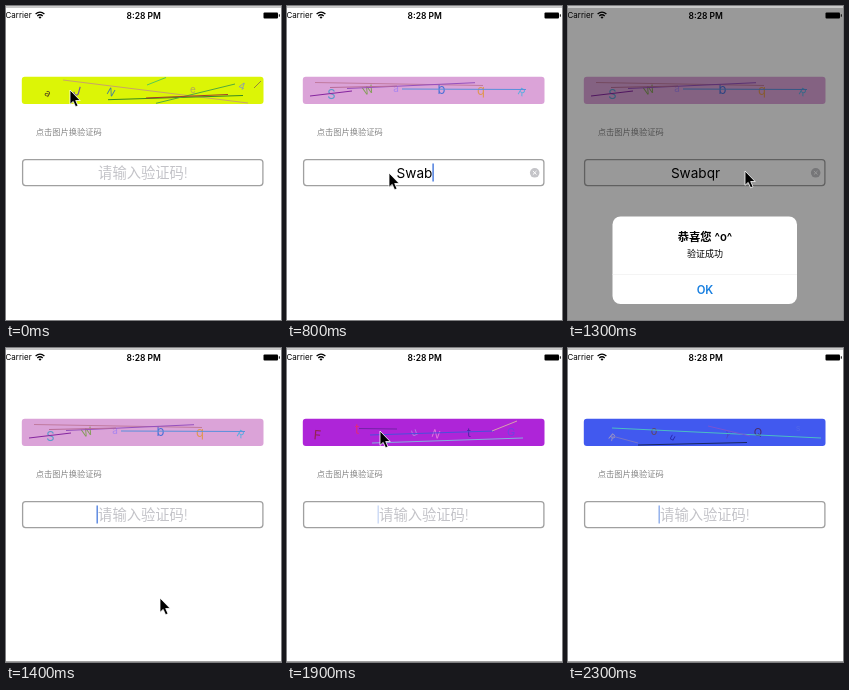
An HTML page for the animation above (2400 ms loop, 275 px wide and 314 px high).

```html
<!DOCTYPE html>
<html lang="zh-CN">
<head>
<meta charset="utf-8">
<style>
html, body { margin: 0; width: 100%; height: 100%; overflow: hidden; background: #fff; }
svg { display: block; width: 275px; height: 314px; }
text { font-family: Inter, "Noto Sans CJK SC", "Noto Sans CJK", sans-serif; }
.mid { text-anchor: middle; }
</style>
</head>
<body>
<svg viewBox="0 0 275 314">
  <rect width="275" height="314" fill="#fff"/>
  <g id="status">
    <text x="-.5" y="12.4" font-size="8">Carrier</text>
    <g fill="none" stroke="#000" stroke-width="1.3">
      <path d="M29.6 8.1Q34 4.2 38.4 8.1M31.3 10Q34 7.5 36.7 10"/>
      <path d="M34 12.8L32.5 11.2Q34 10 35.5 11.2Z" fill="#000" stroke="none"/>
    </g>
    <text x="137.7" y="12.5" font-size="8.5" font-weight="600" class="mid">8:28 PM</text>
    <rect x="257.5" y="6.5" width="14.5" height="6" rx="1"/>
    <rect x="272.8" y="8.3" width="1" height="2.4"/>
  </g>
  <g id="captcha"></g>
  <text x="29.7" y="128.8" font-size="8.25" fill="#858585">点击图片换验证码</text>
  <rect x="16.6" y="153.6" width="240.3" height="26" rx="3" fill="#fff" stroke="#a0a0a0" stroke-width="1.3"/>
  <text id="hint" x="137" y="171.8" font-size="14.3" font-weight="300" fill="#c3c3c8" class="mid">请输入验证码!</text>
  <text id="entry" x="127.5" y="171.6" font-size="13.6" class="mid"></text>
  <rect id="caret" y="157.5" width="1.4" height="18" fill="#4276dc"/>
  <g id="clear">
    <circle cx="247.7" cy="166.8" r="4.8" fill="#c4c4c8"/>
    <path d="M245.9 165l3.6 3.6m0-3.6l-3.6 3.6" stroke="#fff"/>
  </g>
  <g id="alert">
    <rect width="275" height="314" opacity=".4"/>
    <rect x="44.5" y="210.5" width="184.5" height="87.5" rx="8" fill="#fff"/>
    <path d="M44.5 268.5H229" stroke="#f0f0f0" stroke-width=".7"/>
    <text x="137" y="235" font-size="11.3" font-weight="600" class="mid">恭喜您 ^o^</text>
    <text x="137" y="251.3" font-size="9" class="mid">验证成功</text>
    <text x="137" y="287.6" font-size="11.3" font-weight="600" fill="#187fe0" class="mid">OK</text>
  </g>
  <path id="floor" d="M0 313.5H275" stroke="#a0a0a0"/>
  <path d="M0 1H275" stroke="#c9c9c9" stroke-width="2"/>
  <path id="pointer" d="M0 0V14.3L3.2 11.4L5.6 16.8L8 15.7L5.7 10.5H10.2Z" fill="#000" stroke="#fff" stroke-width=".8"/>
</svg>
<script>
const LOOP = 2400, STEP = 100;
const el = id => document.getElementById(id);

// Glyph: character, centre x, centre y, size, turn, colour. Line: path, colour.
const captchas = {
  yellow: {
    fill: '#dcf506',
    glyphs: [['a', 42, 87, 10, 30, '#57471c'], ['J', 71, 85, 13, 15, '#7658a0'], ['N', 105, 86, 10, 30, '#4a8295'],
      ['e', 187, 83, 10, 0, '#b4ab58'], ['4', 236, 80, 10, 20, '#8d9db0']],
    lines: [['M57 74L242 97', '#c9a467'], ['M102 93.7L237 89.5', '#378b20'], ['M141 79L160 71.5', '#55c956'],
      ['M150 97.3L229 78', '#52aa3d'], ['M140 92L222 88.5', '#a33d28'], ['M248 82L255 75', '#96853a']]
  },
  pink: {
    fill: '#dba3d8',
    glyphs: [['S', 44.5, 88, 13, 0, '#5b9ac9'], ['W', 81, 84, 11, -20, '#7f9d52'], ['a', 109, 82, 10, 0, '#aa86ee'],
      ['b', 154.5, 83.5, 13, 0, '#4a70d6'], ['q', 194, 84, 13, 0, '#df9753'], ['R', 234.5, 86, 10, 30, '#55aee0']],
    lines: [['M28 76.5L196 79.5', '#c17a9f'], ['M23 90L65 85', '#85259f'], ['M60 82.5L188 76.7', '#9650bd'],
      ['M43 81.5L110 80', '#b96c98'], ['M115 83L239 83.5', '#5990dc']]
  },
  purple: {
    fill: '#ae25d8',
    glyphs: [['F', 30.5, 87, 13, 5, '#932451'], ['t', 70, 81, 13, 0, '#e02b79'], ['u', 127, 84, 11, -20, '#b17be0'],
      ['N', 149, 86, 11, 20, '#df77dc'], ['t', 182, 85, 12, 0, '#5422a6'], ['G', 224, 84, 11, 0, '#7343df']],
    lines: [['M72 80.5L110 81', '#7322a7'], ['M85 95L236 90', '#87addd'], ['M83 87L207 83', '#4b4fdb'],
      ['M205 83L230 73', '#d9a2ae']]
  },
  blue: {
    fill: '#4159ef',
    glyphs: [['R', 44, 89, 9, 40, '#a39bc0'], ['o', 86, 83.5, 11, 0, '#604764'], ['u', 105, 89, 9, 30, '#2525a8'],
      ['Y', 160, 87, 10, 20, '#4947c8'], ['Q', 190, 84, 11, 0, '#482c66'], ['s', 230, 80, 9, 0, '#5067e8']],
    lines: [['M44 80L253 90', '#4bbdc4'], ['M70 97L179 94.5', '#182760'], ['M140 78L182 88', '#7953d3'],
      ['M44 88L70 95', '#7775c9']]
  }
};

const glyph = ([char, x, y, size, turn, color]) =>
  `<text class="mid" font-size="${size}" fill="${color}" transform="translate(${x} ${y}) rotate(${turn})" y="${size * .36}">${char}</text>`;
const line = ([d, color]) => `<path d="${d}" stroke="${color}"/>`;

el('captcha').innerHTML = Object.entries(captchas).map(([name, { fill, glyphs, lines }]) =>
  `<g id="${name}"><rect x="15.8" y="70.8" width="241.7" height="27.2" rx="3" fill="${fill}"/>` +
  glyphs.map(glyph).join('') + lines.map(line).join('') + '</g>').join('');

const captchaTimes = [[0, 'yellow'], [300, 'pink'], [1700, 'purple'], [2100, 'blue']];
const typing = [[0, ''], [700, 'Sw'], [800, 'Swab'], [900, 'Swabq'], [1000, 'Swabqr'], [1400, '']];
const pointerPath = [[0, 64, 84], [300, 64, 84], [600, 98, 180], [800, 102, 167], [1000, 112, 167],
  [1200, 177, 165], [1300, 177, 165], [1400, 154, 250], [1700, 93, 83], [2300, 93, 83]];
const caretFade = [[600, 1], [900, 1], [1200, .65], [1400, .9], [1600, 1], [1900, .28], [2300, .6]];

const latest = (keys, t) => keys.filter(k => k[0] <= t).pop()[1];

function tween(keys, t) {
  const i = keys.findIndex(k => k[0] > t);
  if (i < 0) return keys[keys.length - 1].slice(1);
  if (i === 0) return keys[0].slice(1);
  const a = keys[i - 1], b = keys[i];
  const p = (t - a[0]) / (b[0] - a[0]), ease = p * p * (3 - 2 * p);
  return a.slice(1).map((v, n) => v + (b[n + 1] - v) * ease);
}

const show = (id, on) => el(id).setAttribute('display', on ? 'inline' : 'none');

function render(time) {
  const t = Math.floor((time % LOOP) / STEP) * STEP;
  const current = latest(captchaTimes, t), typed = latest(typing, t);
  const alerting = t >= 1300 && t < 1400;

  Object.keys(captchas).forEach(name => show(name, name === current));
  el('entry').textContent = typed;
  show('hint', !typed);
  show('clear', typed);
  show('alert', alerting);
  show('floor', t >= 1400);

  show('caret', t >= 600 && !alerting);
  el('caret').setAttribute('x', typed ? 127.5 + el('entry').getComputedTextLength() / 2 : 90.5);
  el('caret').setAttribute('opacity', tween(caretFade, t)[0]);

  show('pointer', t < 2300);
  el('pointer').setAttribute('transform', `translate(${tween(pointerPath, t)})`);
}

const start = performance.now();
function loop() {
  render(performance.now() - start);
  requestAnimationFrame(loop);
}
loop();
</script>
</body>
</html>
```
